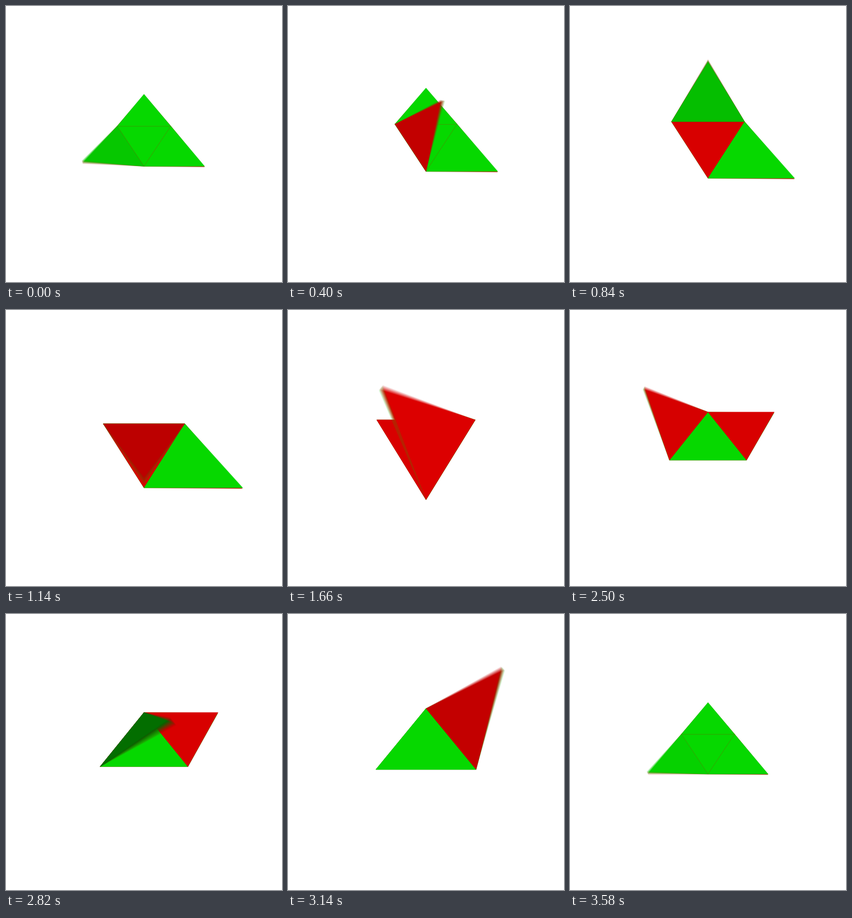
Animation of 500 by 500 pixels, one loop 3600 ms. Source, as an HTML page with a canvas:

```html
<!DOCTYPE html>
<html lang="en">
<head>
<meta charset="utf-8">
<title>Folding triangles</title>
<style>
  html, body { margin: 0; width: 100%; height: 100%; overflow: hidden; background: #fff; }
  canvas { display: block; width: 500px; height: 500px; }
</style>
</head>
<body>
<canvas id="stage" width="500" height="500"></canvas>
<script>
const SIZE = 500, LOOP = 3600, PHASE = 1800, FOLD = 600, STEP = 20;
const SAMPLES = 12, LEAD = 19;          // motion blur
const TILT = Math.PI / 5, EYE = 250 * Math.sqrt(3);
const SIN = Math.sin(TILT), COS = Math.cos(TILT);
const GAP = 0.018;                      // angle between the two faces of a flap
const GREEN = [0.028, 1, 0], RED = [1, 0, 0];

const out = document.getElementById('stage').getContext('2d');
const buffer = document.createElement('canvas');
buffer.width = buffer.height = SIZE;
const g = buffer.getContext('2d');
g.lineWidth = 0.5;
g.lineJoin = 'round';

// Point on the tilted sheet (h is the height above it) to the screen
function project([x, y, h]) {
  const k = EYE / (EYE - y * SIN - h * COS);
  return [250 + x * k, 250 + (y * COS - h * SIN - 10) * k];
}

function shade(color, facing) {
  const light = 30 + 230 * Math.abs(facing);
  return `rgb(${color.map(c => Math.round(c * light)).join(',')})`;
}

function fill(points, style) {
  g.beginPath();
  for (const p of points) g.lineTo(...p);
  g.closePath();
  g.fillStyle = g.strokeStyle = style;
  g.fill();
  g.stroke();
}

function flapPoints(dir, side, angle) {
  const r = side / (2 * Math.sqrt(3)), dx = Math.cos(dir), dy = Math.sin(dir);
  const reach = r + 3 * r * Math.cos(angle), half = side / 2;
  return [
    [r * dx - half * dy, r * dy + half * dx, 0],
    [r * dx + half * dy, r * dy - half * dx, 0],
    [reach * dx, reach * dy, 3 * r * Math.sin(angle)]
  ].map(project);
}

function isFront([a, b, c]) {
  return (b[0] - a[0]) * (c[1] - a[1]) - (b[1] - a[1]) * (c[0] - a[0]) > 0;
}

function drawFlap(dir, side, angle, front, back) {
  const facing = COS * Math.cos(angle) - SIN * Math.sin(dir) * Math.sin(angle);
  const points = flapPoints(dir, side, angle), up = isFront(points);
  if (angle < Math.PI) {
    fill(flapPoints(dir, side, angle + (up ? -GAP : GAP)), shade(up ? back : front, facing));
  }
  fill(points, shade(up ? front : back, facing));
}

function drawScene(time) {
  const t = time % LOOP, second = t >= PHASE, local = t % PHASE;
  const side = 100 * 2 ** (local / PHASE);
  const [front, back] = second ? [RED, GREEN] : [GREEN, RED];
  const start = (second ? 90 : 150) * Math.PI / 180;
  const dirs = [0, 1, 2].map(i => start + i * 2 * Math.PI / 3);

  g.fillStyle = '#fff';
  g.fillRect(0, 0, SIZE, SIZE);

  const radius = side / Math.sqrt(3);
  fill(dirs.map(d => project([
    radius * Math.cos(d + Math.PI / 3), radius * Math.sin(d + Math.PI / 3), 0
  ])), shade(front, COS));

  // The moving flap goes on top of the resting ones
  const active = Math.floor(local / FOLD);
  const order = [0, 1, 2].filter(i => i !== active).concat(active);
  for (const i of order) {
    const p = Math.min(1, Math.max(0, (local - i * FOLD) / FOLD));
    drawFlap(dirs[i], side, p * Math.PI, front, back);
  }
}

let last = -1;
function render() {
  const step = Math.floor((performance.now() % LOOP) / STEP);
  if (step !== last) {
    last = step;
    for (let i = 0; i < SAMPLES; i++) {
      drawScene(step * STEP + LEAD + STEP * (i + 0.5) / SAMPLES);
      out.globalAlpha = 1 / (i + 1);
      out.drawImage(buffer, 0, 0);
    }
  }
  requestAnimationFrame(render);
}
render();
</script>
</body>
</html>
```
